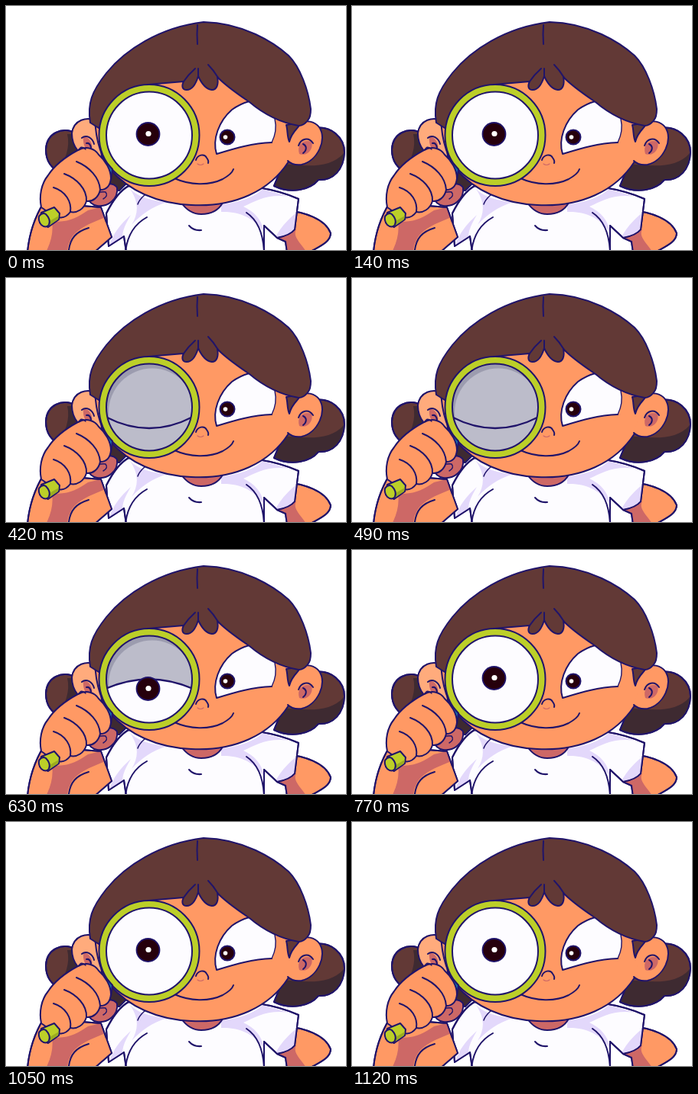
Recreate the animation shown at these times as an HTML page with a canvas. Size 444 by 320 pixels, loop 1.19 s.

```html
<!DOCTYPE html>
<html lang="en">
<head>
<meta charset="utf-8">
<title>Magnifying glass blink</title>
<style>
html, body { margin: 0; width: 100%; height: 100%; overflow: hidden; background: #fff; }
canvas { display: block; width: 444px; height: 320px; }
</style>
</head>
<body>
<canvas id="stage" width="444" height="320"></canvas>
<script>
const ctx = document.getElementById('stage').getContext('2d');
const INK = '#20146a', HAIR = '#623936', DARK = '#3e2a31', SKIN = '#ff9964',
      SHADE = '#cd6866', WHITE = '#fdfcff', LILAC = '#e3d8fb', PUPIL = '#26000c',
      RIM = '#bccf28', RIM_DARK = '#9bad20', LID = '#bcbcca', LID_DARK = '#9c9caf';
const STEP = 70, LOOP = 1190;
const LENS = { x: 187, y: 169.5, r: 56 };

// Lid edge height at its ends and middle, and how far the pupil drops
const HIGH = { ends: 150, mid: 134, drop: 0 };
const HALF = { ends: 182, mid: 169.5, drop: 14 };
const SHUT = { ends: 182, mid: 197, drop: 14, closed: true };
const BLINK = { 4: HIGH, 5: HALF, 6: SHUT, 7: SHUT, 8: SHUT, 9: HALF, 10: HIGH };

ctx.lineCap = ctx.lineJoin = 'round';

function shape(d, fill, line = INK, width = 2) {
  const p = new Path2D(d);
  if (fill) { ctx.fillStyle = fill; ctx.fill(p); }
  if (line) { ctx.strokeStyle = line; ctx.lineWidth = width; ctx.stroke(p); }
}
const stroke = (d, width = 2) => shape(d, null, INK, width);
const tint = (d, fill) => shape(d, fill, null);

function disc(x, y, rx, ry, fill, line = 0) {
  ctx.beginPath();
  ctx.ellipse(x, y, rx, ry, 0, 0, Math.PI * 2);
  if (fill) { ctx.fillStyle = fill; ctx.fill(); }
  if (line) { ctx.strokeStyle = INK; ctx.lineWidth = line; ctx.stroke(); }
}

function inside(d, draw) {
  ctx.save();
  ctx.clip(new Path2D(d));
  draw();
  ctx.restore();
}

function backHair() {
  const bun = 'M404 160C424 157 442 172 442 192C441 214 428 229 408 228C397 241 373 247 350 236L364 202Z';
  shape(bun, HAIR);
  inside(bun, () => tint('M345 206C385 208 420 217 441 193L444 245H345Z', DARK));
  stroke(bun);
  const left = 'M94 168C72 156 53 168 52 188C52 204 60 214 73 219L108 194Z';
  shape(left, HAIR);
  inside(left, () => tint('M80 168C84 185 78 202 66 218L108 200L96 168Z', DARK));
  stroke(left);
  shape('M126 198L158 232L148 242L124 240Z', DARK);
}

function shirt() {
  const arm = 'M366 268C389 270 417 279 424 298C424 310 408 316 396 323H367L365 309L354 304Z';
  shape(arm, SKIN);
  inside(arm, () => tint('M350 302L379 293C374 302 384 310 392 322H366Z', SHADE));
  stroke(arm);
  const body = 'M160 236C149 242 139 256 131 272L134 315L154 302L157 323H337L337 288L354 304C365 302 373 298 377 293L382 253C362 244 342 240 329 238Z';
  shape(body, WHITE);
  inside(body, () => {
    tint('M158 235C168 250 191 256 211 257C190 263 176 274 164 287C174 271 174 254 158 235Z', LILAC);
    tint('M134 316C140 297 151 285 163 274C154 289 150 300 153 309Z', LILAC);
    tint('M281 260C306 258 327 249 335 240L370 250C341 246 326 256 310 263C324 270 334 279 337 297C325 279 306 269 281 270Z', LILAC);
    tint('M351 304C361 287 372 276 381 270L380 297Z', LILAC);
  });
  stroke(body);
  stroke('M156 323C158 302 166 287 184 277');
  stroke('M314 271C329 281 336 299 337 323');
  stroke('M239 288Q245 295 255 294');
  stroke('M172 260Q174 254 181 248', 1.5);
  shape('M229 258C236 268 245 273 255 273C267 273 277 269 283 258Z', SHADE);
}

function leftEar() {
  shape('M121 152C105 143 88 150 86 167C86 184 96 197 114 202L125 198Z', '#ffab7c');
  tint('M101 171C109 172 114 180 112 190C104 190 100 183 101 171Z', SHADE);
  stroke('M99 173C105 168 113 173 115 181M105 180Q110 179 111 186');
}

function rightEar() {
  shape('M383 154C392 149 403 151 409 159C420 175 407 203 386 208C378 209 372 207 368 203', SKIN);
  shape('M366 156L384 153C385 159 374 162 370 178C367 172 368 163 366 156Z', HAIR);
  tint('M383 194C379 181 389 174 399 178C402 187 394 198 383 194Z', SHADE);
  stroke('M382 183C385 174 395 171 401 180M388 181C394 184 392 190 388 193');
}

function face() {
  const jaw = 'C160 242 197 259 242 261C298 264 344 243 369 204';
  tint('M116 132C115 166 121 194 136 214' + jaw + 'C382 185 383 166 381 150L330 80H230Z', SKIN);
  stroke('M116 132C115 166 121 194 136 214' + jaw);
}

function features() {
  tint('M275 194C269 175 278 151 295 136C309 126 325 121 338 125L351 148C354 161 351 171 347 179C320 180 298 187 275 194Z', WHITE);
  stroke('M347 179C320 180 298 187 275 194C269 175 278 151 295 136C309 126 325 121 338 125');
  stroke('M351 148C354 161 351 171 347 179', 1.4);
  disc(289, 172, 9.5, 9.5, PUPIL, 2);
  disc(286.5, 172, 2.8, 2.8, '#fff');
  stroke('M248 202C250 195 259 193 262 199Q265 203 264 206');
  shape('M250 207Q254 210 258 207', null, SHADE, 1.2);
  stroke('M220 226C240 235 265 236 283 227C292 222 296 217 297 214');
}

function frontHair() {
  shape('M110 153C106 128 112 112 131 88C155 58 200 28 258 21C310 22 350 48 369 65C384 80 395 110 398 135Q398 146 394 150Q389 157 382 157C359 153 338 143 318 126C302 115 287 105 276 93C278 103 275 110 269 110C260 109 255 101 251 92C248 102 243 110 236 110C230 110 229 105 232 99L185 103L121 160Z', HAIR);
  stroke('M250 25Q249 37 250 50');
  stroke('M247 82Q238 90 232 99M264 77Q271 84 277 94M251 82V92');
}

function arm() {
  const d = 'M49 258C37 278 30 300 28 323H115L138 303L124 264Z';
  shape(d, SKIN);
  inside(d, () => {
    tint('M60 282C80 285 94 277 107 268L128 263L132 276C113 284 93 291 85 305Q80 314 80 323H52Q63 302 60 282Z', SHADE);
    tint('M84 323C85 306 94 296 111 291L142 278V323Z', SKIN);
  });
  stroke(d);
  stroke('M82 320C84 305 91 296 108 291');
}

function hand() {
  shape('M131 205L139 214L137 228L129 226Z', '#176eae');
  shape('M111 242C121 234 139 229 145 238C147 252 134 264 119 262C112 261 108 256 105 250Z', SHADE);
  stroke('M113 248Q121 243 130 244Q134 249 127 253', 1.5);
  shape('M46 264C43 249 46 233 55 222C64 208 81 196 94 189C105 183 116 187 121 195C130 203 137 215 137 226C136 236 131 241 123 241C121 251 113 257 105 256C102 266 93 272 84 270C77 280 67 279 59 273Z', SKIN);
  stroke('M62 238C78 243 86 257 84 270M76 220C92 226 106 240 105 256M92 204C109 211 122 225 123 241');
  stroke('M95 189Q98 182 104 188', 1.5);
  // handle end
  shape('M46 271L63 264L70 272L69 280L55 290L44 284Z', RIM);
  tint('M57 282L69 275L68 280L56 288Z', RIM_DARK);
  shape('M43 276Q47 270 52 273Q59 280 56 287Q52 292 46 287Q42 282 43 276Z', RIM);
}

function lens(lid) {
  const { x, y, r } = LENS;
  disc(x, y, 65.5, 66.5, RIM, 2);
  ctx.save();
  disc(x, y, r, r + 1, WHITE);
  ctx.clip();
  if (lid) drawLid(lid);
  if (!lid || !lid.closed) drawPupil(168 + (lid ? lid.drop : 0));
  ctx.restore();
  disc(x, y, r, r + 1, null, 2);
}

function drawPupil(y) {
  disc(185.5, y, 15, 15, PUPIL, 1.8);
  disc(186, y - 0.5, 3.6, 3.6, '#fff');
}

function drawLid({ ends, mid, closed }) {
  const edge = `M130 ${ends}Q187 ${2 * mid - ends} 244 ${ends}`;
  // the rim casts a crescent of shadow on the lid
  inside(closed ? 'M120 95H255V245H120Z' : edge + 'V95H130Z', () => {
    ctx.fillStyle = LID_DARK;
    ctx.fillRect(120, 95, 135, 150);
    disc(LENS.x + 4, LENS.y + 7, LENS.r + 1, LENS.r + 2, LID);
  });
  stroke(edge, 2.4);
}

function draw(time) {
  const step = Math.floor((time % LOOP) / STEP);
  ctx.fillStyle = '#fff';
  ctx.fillRect(0, 0, 444, 320);
  backHair();
  shirt();
  leftEar();
  face();
  rightEar();
  features();
  frontHair();
  arm();
  lens(BLINK[step]);
  hand();
}

const start = performance.now();
function tick(now) {
  draw(Math.max(0, now - start));
  requestAnimationFrame(tick);
}
draw(0);
requestAnimationFrame(tick);
</script>
</body>
</html>
```
